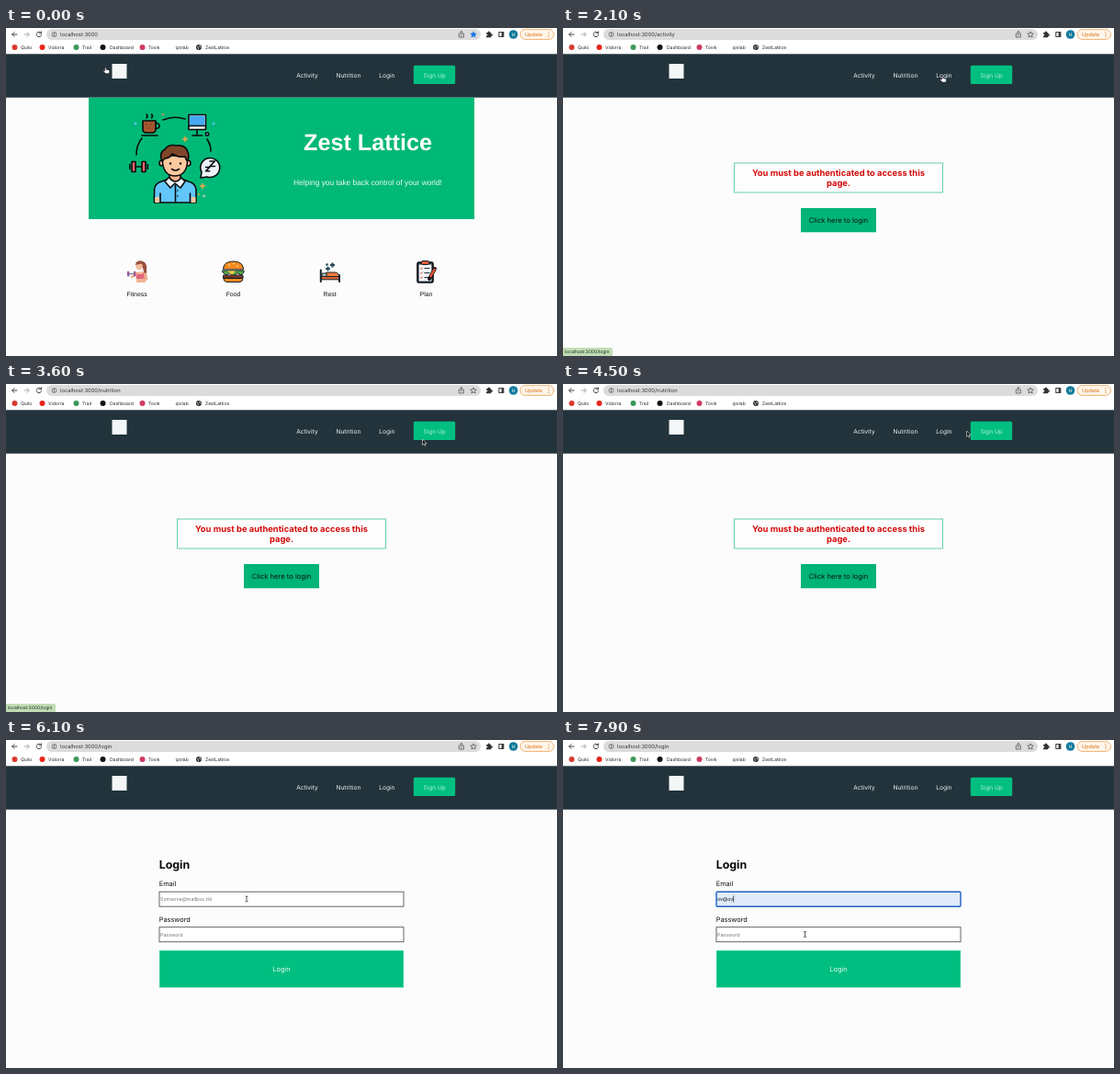
Write an HTML page that moves like this. It is 600 px wide and 357 px high and loops after 8000 ms.

```html
<!DOCTYPE html>
<html lang="en">
<head>
<meta charset="utf-8">
<title>Habit app walkthrough</title>
<style>
html, body { margin: 0; width: 100%; height: 100%; overflow: hidden; background: #fcfcfc; }
svg { display: block; width: 100%; height: 100%; }
text { font-family: Inter, Roboto, sans-serif; white-space: pre; text-rendering: geometricPrecision; }
.arial { font-family: "Liberation Sans", sans-serif; }
.line { fill: none; stroke: #444; stroke-width: 1; stroke-linecap: round; stroke-linejoin: round; }
.ink { stroke: #0b0b0b; stroke-width: 1.6; stroke-linecap: round; stroke-linejoin: round; }
.thin { stroke: #16242c; stroke-width: 1; stroke-linecap: round; stroke-linejoin: round; }
</style>
</head>
<body>
<svg id="stage" viewBox="0 0 600 357"></svg>
<script>
const LOOP = 8000, STEP = 100;
const GREEN = '#00bf80', INK = 'class="ink"', THIN = 'class="thin"';

const text = (x, y, s, size, fill = '#111', more = '') =>
  `<text x="${x}" y="${y}" font-size="${size}" fill="${fill}" ${more}>${s}</text>`;
const mid = (x, y, s, size, fill, more = '') => text(x, y, s, size, fill, `text-anchor="middle" ${more}`);
const rect = (x, y, w, h, fill, more = '') =>
  `<rect x="${x}" y="${y}" width="${w}" height="${h}" fill="${fill}" ${more}/>`;
const dot = (x, y, r, fill, more = '') => `<circle cx="${x}" cy="${y}" r="${r}" fill="${fill}" ${more}/>`;
const path = (d, fill = 'none', more = INK) => `<path d="${d}" fill="${fill}" ${more}/>`;
const group = (id, body) => `<g id="${id}">${body}</g>`;
const plus = (x, y, r, c, w = 1.5) => path(`M${x - r} ${y}h${2 * r}M${x} ${y - r}v${2 * r}`, 'none', `stroke="${c}" stroke-width="${w}"`);

function toolbar() {
  const marks = [
    [9.5, '#d93a30', 16, 'Quilo'], [39.5, '#e8251c', 46, 'Vidorra'], [76.5, '#3a9a58', 83, 'Trail'],
    [105.5, '#111', 113, 'Dashboard'], [148.5, '#cf3a63', 155, 'Tovik'], [0, '', 184.5, 'qivlab'],
    [0, '', 217, 'ZestLattice']
  ];
  const list = marks.map(([ix, c, x, s]) => (c ? dot(ix, 21, 3, c) : '') + text(x, 22.9, s, 5, '#222')).join('');
  return rect(0, 0, 600, 28, '#fff') + rect(44, 1, 473, 12, '#dcdcdc', 'rx="6"') +
    path('M12 7H6.8M9 4.6L6.6 7L9 9.4', 'none', 'class="line"') +
    path('M20 7h5M23 4.6L25.2 7L23 9.4', 'none', 'class="line" style="stroke:#aaa"') +
    path('M38 5.2A2.7 2.7 0 1 0 38.6 7.6M38.6 3.8v2h-2', 'none', 'class="line"') +
    dot(52.5, 7, 2.5, 'none', 'stroke="#555" stroke-width=".7"') +
    path('M52.5 6.6v1.8M52.5 5.4v.3', 'none', 'class="line" style="stroke-width:.7"') +
    path('M494.3 6h-1v4h5v-4h-1M495.8 8V3.6M494.5 4.8l1.3-1.3l1.3 1.3', 'none', 'class="line" style="stroke-width:.7"') +
    path('M509 3.9l.95 2.1l2.3 .2l-1.75 1.5l.55 2.25l-2.05-1.2l-2.05 1.2l.55-2.25l-1.75-1.5l2.3-.2z', 'none',
      'id="star" stroke="#444" stroke-width=".7"') +
    path('M523 5h1.9a1.1 1.1 0 1 1 2 0h1.4v1.6a1.1 1.1 0 1 1 0 2v1.7h-5.3v-1.8a1 1 0 1 0 0-1.9z', '#333', '') +
    rect(536.8, 4.6, 5, 4.8, '#fff', 'stroke="#333"') + rect(539.6, 4.6, 2.2, 4.8, '#333') +
    dot(552.5, 7, 4.8, '#147c9c') + mid(552.5, 8.8, 'H', 5, '#fff') +
    rect(560, 1.6, 36.5, 10.8, '#fff5ea', 'rx="5.4" stroke="#efa050" stroke-width=".8"') +
    text(565, 9, 'Update', 5.6, '#d87518') + [4.8, 7, 9.2].map(y => dot(591, y, .6, '#d87518')).join('') +
    list + dot(210, 21, 3, '#333') + path('M208 20q2 1 1.5 2.8M211 18.5q-1 1.8 1.5 2.8', 'none', 'stroke="#ddd" stroke-width=".8"') +
    text(59, 9.2, '', 5.8, '#333', 'id="url"');
}

function header() {
  return rect(0, 28.3, 600, 47.4, '#22333b') + rect(115.5, 39, 16, 16, '#f4f7f7') +
    [[316.3, 'Activity'], [359.5, 'Nutrition'], [406.3, 'Login']].map(([x, s]) => text(x, 53.7, s, 6.6, '#f0f2f3')).join('') +
    rect(443.8, 40.8, 45.4, 20.2, GREEN, 'rx="1.5"') + mid(466.7, 53.7, 'Sign Up', 6.5, '#b8efd9');
}

function portrait() {
  return path('M161.5 190v-13q0-8 8-10l8-3h13l8 3q8.5 2 8.5 10v13z', '#62c6fa') +
    path('M162.3 184h5v6h-5zM201.5 184h5v6h-5z', '#fdc9a0', '') + path('M168 180v10M200.500 180v10') +
    path('M178 158v6q6 8 12 0v-6z', '#f2b48c') +
    path('M177 163l-4 4l6 7l5-5l6 5l5-7l-4-4q-7 8-13 0z', '#eff4fb') +
    path('M184.500 171v18') + dot(187, 177, .8, '#111') + dot(187, 183, .8, '#111') +
    path('M170 144a3 3 0 0 0 0 6M198 144a3 3 0 0 1 0 6', '#f9c9a4') +
    path('M170.500 139h27v8q-2 14-13.500 14t-13.500-14z', '#fdc9a0') +
    path('M170 145q-4-9 3-13q4-6 13-4q10-1 12 7q2 4-.5 10q-2-2-2.500-5q-8 1-14-3q-3 5-8 5q-1 1-3 3z', '#80462a') +
    dot(179, 147.5, 1.2, '#111') + dot(190, 147.5, 1.2, '#111') + path('M180.500 153.500q4 3 8 0');
}

function hero() {
  const zed = (x, y, r) => path(`M${x} ${y}h${r}l${-r} ${r}h${r}`);
  const cup = path('M149 101h14v9q0 4-4 4h-6q-4 0-4-4z', '#a5562f') + path('M163 103.500q4 0 4 3t-4 3M148 117h17M153 94q2 2 0 4M158.500 94q2 2 0 4') +
    [[153, 105], [158, 105], [155.5, 109]].map(p => dot(...p, .8, '#6b321b')).join('');
  const monitor = rect(199, 94.5, 18.5, 16, '#f3f6fa', INK) + rect(200, 95.5, 16.5, 10.5, '#45aaf0') +
    path('M199 106.500h18.500M208 111v5M203 117h10.500');
  const dumbbell = path('M140 151h9') + rect(137, 145.5, 4, 11, '#f0646c', INK) + rect(148, 145.5, 4, 11, '#f0646c', INK) +
    path('M134.800 148.500v5M154.300 148.500v5');
  return rect(90, 75.7, 420, 132.3, '#00b877') +
    path('M142 138Q142 127 148 120M171 100Q183 95 195 99M219 121Q223 127 223 134') +
    dot(219, 115.5, 1.7, '#62c6fa', INK) + cup + monitor + dumbbell +
    path('M212 163l1-6a10.500 10.500 0 1 1 6 5z', '#eef3fa') + zed(222, 145, 5.5) + zed(217.5, 151.5, 4.2) + portrait() +
    plus(195, 121, 3, '#f5a64a') + plus(214, 172, 3, '#f5a64a') + plus(215.5, 183, 1.8, '#8fc9ae') +
    plus(141, 104, 1.6, '#58c4f0') + plus(226, 104, 1.4, '#58c4f0') + plus(171, 94, 1.3, '#c98a5a') + dot(210, 181, 1, '#f5a64a') +
    mid(394, 133.4, 'Zest Lattice', 25.2, '#fff', 'class="arial" font-weight="700"') +
    mid(394, 171, 'Helping you take back control of your world!', 8.35, '#eefaf5', 'class="arial"');
}

function cards() {
  const woman = path('M141 256q3-4 8-2q5 2 4 9q1 4-2 6l-2-8z', '#98503f', '') +
    path('M141 266l8-1l4 4l-1 8h-10z', '#f3b898', '') + path('M142 266l2 2h4l2-2l1 7h-9z', '#e2647f', '') +
    dot(145, 259.5, 3.7, '#f6bd9d') + path('M140.500 258q4-6 9-2l-4 1z', '#98503f', '') +
    path('M142 268l-5 3M152 268l1 5l-8 2', 'none', 'stroke="#f0ad8d" stroke-width="2.500" stroke-linecap="round"') +
    path('M133 267.500h8', 'none', 'stroke="#79859a" stroke-width="1.500"') + rect(132, 264.8, 2.3, 5.5, '#9a5a9c') + rect(139, 264.8, 2.3, 5.5, '#9a5a9c');
  const burger = path('M236.500 262.500q0-8.500 11-8.500t11 8.500z', '#f28b1e', THIN) +
    path('M236 264h23v2l-3 3l-4-2.500l-4 3.500l-5-3.500l-3 2.500l-4-3z', '#58a844', THIN) +
    path('M241 264.500h9l-4 4z', '#ffd23f', '') + rect(237, 269, 21, 3, '#8f3a27', THIN) +
    path('M237 272.500h21q0 4-4 4h-13q-4 0-4-4z', '#f28b1e', THIN) +
    [[243, 258], [248, 256.5], [252, 259]].map(p => dot(...p, .8, '#fff1bf')).join('');
  const bed = rect(343.5, 270.5, 19, 3.3, '#d9622f', THIN) + path('M349 266h9q4 0 5 4.500h-14z', '#ee7b3b', THIN) +
    rect(344.5, 267, 4.5, 3.3, '#b9c8d2', THIN) + path('M342.800 263.500v12.500M363 269v7', 'none', 'class="thin" style="stroke-width:2"') +
    plus(350.5, 262, 2.3, '#254a5a', 2.2) + plus(355.5, 258, 2.5, '#254a5a', 2.2) + plus(349.5, 257.5, 1.3, '#254a5a');
  const board = rect(448, 255, 17, 22, '#33475a', `${INK} rx="1.5"`) + rect(449.7, 257.5, 13.6, 18, '#f5f6f8') +
    rect(452.5, 253.5, 8, 4, '#e05a3a', `${THIN} rx="1"`) +
    [262, 267, 272].map(y => path(`M451 ${y - .5}l1 1l1.600-2`, 'none', 'stroke="#d4422f"') + rect(455.5, y - 1, 6, 1.1, '#26333d')).join('') +
    path('M467 262l-6 11', 'none', 'stroke="#151515" stroke-width="3.800" stroke-linecap="round"') +
    path('M467 262l-5 9', 'none', 'stroke="#e8563b" stroke-width="2.400"');
  return woman + burger + bed + board + ['Fitness', 'Food', 'Rest', 'Plan'].map((s, i) =>
    mid(142.5 + 105 * i, 291.8, s, 6.9, '#111', 'class="arial"')).join('');
}

function denied() {
  const bold = 'font-weight="700"';
  return rect(186.5, 147, 227, 32, '#fdfdfd', 'stroke="#69cfa9" stroke-width="1"') +
    mid(300, 160.5, 'You must be authenticated to access this', 9.4, '#d60808', bold) +
    mid(300, 172.4, 'page.', 9.4, '#d60808', bold) +
    rect(259, 196, 82, 26.3, '#00b377') + mid(300, 212, 'Click here to login', 7.6, '#0b1511');
}

function login() {
  const field = 'stroke="#555" stroke-width=".9"';
  return text(166.7, 139.6, 'Login', 12.4, '#080808', 'font-weight="700"') + text(166.7, 159, 'Email', 7.4) +
    rect(167, 165.2, 266, 16, '#fff', `id="email" ${field}`) + text(168, 175, '', 5.3, '#777', 'id="value"') +
    rect(0, 169.5, .7, 7, '#000', 'id="caret"') + text(166.7, 186.7, 'Please enter a valid email', 5.3, '#f02020', 'id="invalid"') +
    group('lower', text(166.7, 197.5, 'Password', 7.4) + rect(167, 203.7, 266, 16, '#fff', field) +
      text(168, 213.5, 'Password', 5.3, '#777') + rect(167, 229, 266, 40.5, GREEN, 'stroke="#bdeedb" stroke-width=".5"') +
      mid(300, 252, 'Login', 7.5, '#e2f8ef')) +
    group('suggest', rect(208.6, 186, 60, 33.3, '#000', 'opacity=".12" rx="1.5"') +
      rect(208, 185, 60, 33.5, '#fff', 'rx="1.5" stroke="#ccc" stroke-width=".5"') +
      rect(208.3, 187.5, 59.4, 14, '#eaeaea', 'id="choice"') +
      text(213, 196.4, 'ov@ov', 5.3) + text(213, 211.3, 'ovanderovander', 5.3));
}

const pointers =
  group('hand', path('M-.5.6q0-.7.6-.7t.7.7v1.700l2.500.5q1.300.3 1.100 1.400l-.5 2.300h-3.700l-2.500-2.500q-.3-1 .6-.8l1.200.6z', '#fff', 'stroke="#222" stroke-width=".5"')) +
  group('arrow', path('M0 0v6.300l1.500-1.300l1 2.200l1.100-.5l-1-2.100h2z', '#111', 'stroke="#fff" stroke-width=".55"')) +
  group('beam', path('M-1.500-3q1.500 0 1.500.8v4.400q0 .8-1.500.8M1.500-3q-1.500 0-1.500.8M1.500 3q-1.500 0-1.500-.8', 'none', 'stroke="#111" stroke-width=".7"'));

document.getElementById('stage').innerHTML = rect(0, 0, 600, 357, '#fcfcfc') + toolbar() + header() +
  group('home', hero() + cards()) + group('denied', denied()) + group('login', login()) +
  group('status', path('M0 348h52q2 0 2 2v7H0z', '#c0deb5', '') + text(1.8, 354.4, '', 5, '#1f2a1c', 'id="link"')) +
  group('cursor', pointers);

const el = {};
document.querySelectorAll('[id]').forEach(n => el[n.id] = n);
const show = (id, on) => el[id].setAttribute('display', on ? 'inline' : 'none');
const at = (steps, t) => steps.filter(s => s[0] <= t).pop();

const route = [
  [0, 108.3, 43], [200, 110, 44], [600, 330, 50], [850, 468, 50], [1250, 332.5, 49.5], [1600, 332.5, 49.5],
  [2000, 413, 52.5], [2200, 413, 52.5], [2500, 372, 51], [2750, 372, 51], [3100, 413, 54], [3200, 413, 54],
  [3600, 453.5, 60], [3900, 466, 51], [4300, 466, 51], [4700, 413, 51], [5400, 413, 51], [6000, 262, 173],
  [7000, 262, 173], [7350, 222, 194], [7500, 222, 194], [7800, 264, 208], [7900, 263.5, 211.5]
];
const pages = [[0, 'home', ''], [1500, 'denied', '/activity'], [2700, 'denied', '/nutrition'], [4800, 'login', '/login']];
const hovers = [[0, null], [200, ''], [700, null], [1400, '/activity'], [2000, '/login'], [2500, '/nutrition'],
  [3000, '/login'], [4000, null], [4800, '/login'], [5400, null]];
const typed = [[0, ''], [6400, 'o'], [6600, 'ov'], [7500, 'ov@ov']];
const links = [[100, 135], [316, 339], [359, 387], [406, 424], [444, 489]];

function position(t) {
  const i = route.findIndex(k => k[0] > t);
  if (i < 0) return route[route.length - 1].slice(1);
  const [t0, x0, y0] = route[i - 1], [t1, x1, y1] = route[i];
  const p = (t - t0) / (t1 - t0), e = p * p * (3 - 2 * p);
  return [x0 + (x1 - x0) * e, y0 + (y1 - y0) * e];
}

function draw(t) {
  const [, page, url] = at(pages, t), hover = at(hovers, t)[1], [typedAt, value] = at(typed, t);
  const focus = t >= 6200, filled = value.includes('@'), bad = value !== '' && !filled;
  ['home', 'denied', 'login'].forEach(id => show(id, id === page));
  el.url.textContent = 'localhost:3000' + url;
  el.star.setAttribute('fill', page === 'home' ? '#1a73e8' : 'none');
  el.star.setAttribute('stroke', page === 'home' ? '#1a73e8' : '#444');

  show('status', hover !== null);
  el.link.textContent = 'localhost:3000' + (hover || '');
  el.status.setAttribute('opacity', t >= 5300 ? .6 : 1);

  el.value.textContent = value || 'Someone@mailbox.tld';
  el.value.setAttribute('fill', value ? '#111' : '#777');
  el.email.setAttribute('fill', filled ? '#e1ebf9' : '#fff');
  el.email.setAttribute('stroke', focus ? '#1f62c4' : '#555');
  el.email.setAttribute('stroke-width', focus ? 1.4 : .9);
  el.email.setAttribute('rx', focus ? 1 : 0);
  const blink = Math.floor((t - Math.max(typedAt, 6200)) / 500) % 2 === 0;
  show('caret', focus && blink);
  if (page === 'login') el.caret.setAttribute('x', 168.2 + (value ? el.value.getComputedTextLength() : 0));
  show('invalid', bad);
  show('suggest', bad);
  show('choice', t >= 7300);
  el.lower.setAttribute('transform', `translate(0 ${bad ? 6.4 : 0})`);

  const [x, y] = position(t);
  const onLink = y > 42 && y < 58 && links.some(([a, b]) => x >= a && x <= b);
  const onField = page === 'login' && !bad && x > 167 && x < 433 && ((y > 165 && y < 181) || (y > 203 && y < 220));
  const kind = onLink ? 'hand' : onField ? 'beam' : 'arrow';
  ['hand', 'arrow', 'beam'].forEach(id => show(id, id === kind));
  show('cursor', t < 6400 || t > 7000);
  el.cursor.setAttribute('transform', `translate(${x} ${y})`);
}

const start = performance.now();
function tick() {
  const t = (performance.now() - start) % LOOP;
  draw(Math.floor(t / STEP) * STEP);
  requestAnimationFrame(tick);
}
tick();
</script>
</body>
</html>
```
